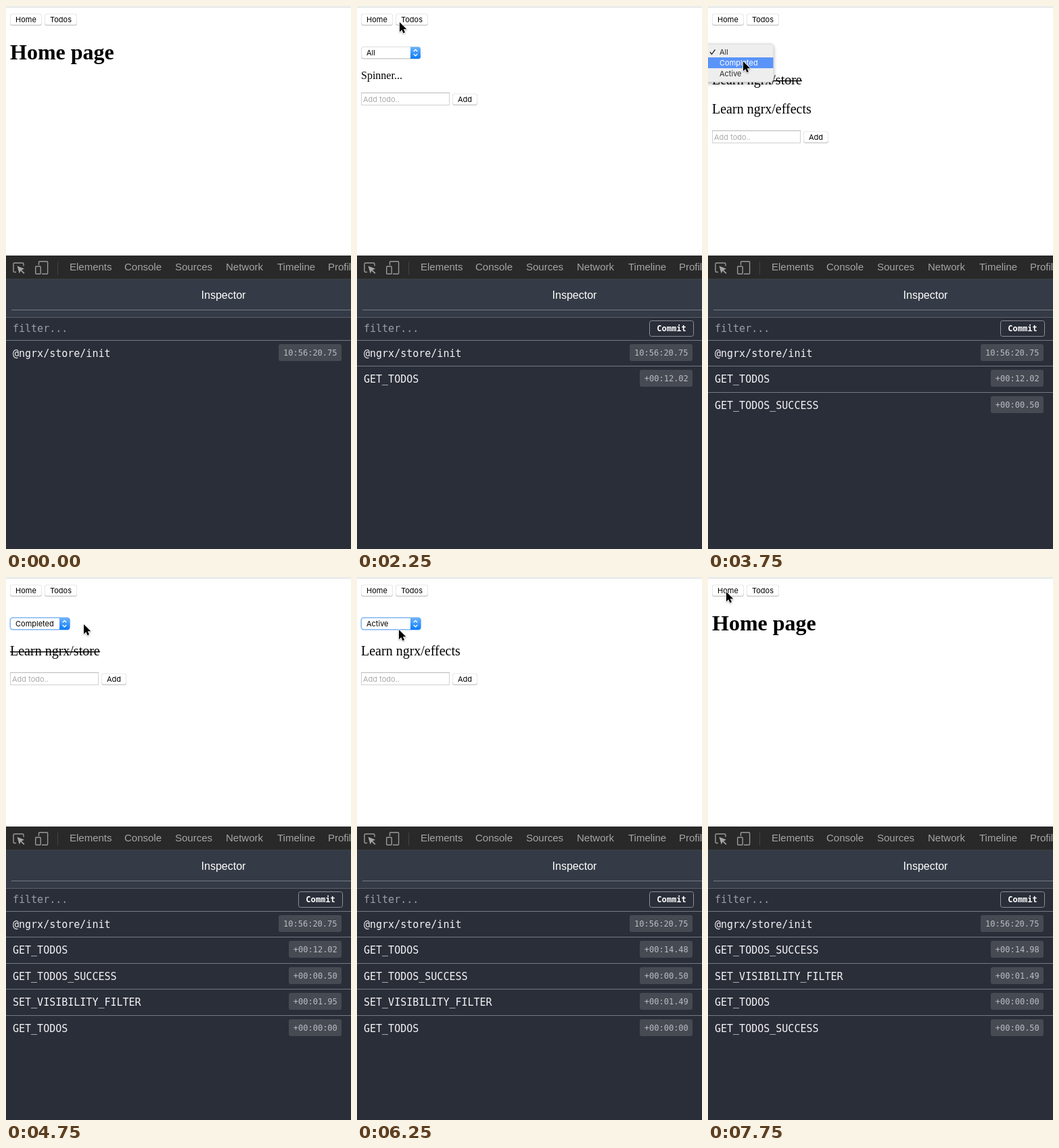
These frames come from a looping animation (510x803 px, 8000 ms). An HTML page:

```html
<!DOCTYPE html>
<html lang="en">
<head>
<meta charset="utf-8">
<title>Todos with inspector</title>
<style>
  html, body { margin: 0; width: 100%; height: 100%; overflow: hidden; background: #fff; }
  svg { display: block; width: 510px; height: 803px; }
  text { white-space: pre; }
  .ui { font: 11px Inter, "Open Sans", sans-serif; }
  .serif { font: 20px "Liberation Serif", Times, serif; }
  .tab { font: 15px "Liberation Sans", Arial, sans-serif; fill: #a5a5a5; }
  .mono { font: 15px "DejaVu Sans Mono", Menlo, monospace; fill: #f4f4f6; }
  .small { font: 12px "DejaVu Sans Mono", Menlo, monospace; }
</style>
</head>
<body>
<svg viewBox="0 0 510 803" xmlns="http://www.w3.org/2000/svg">
  <defs>
    <linearGradient id="blue" x1="0" y1="0" x2="0" y2="1">
      <stop offset="0" stop-color="#6cb3fa"/><stop offset="1" stop-color="#0a7bfb"/>
    </linearGradient>
    <filter id="soft" x="-20%" y="-20%" width="140%" height="150%">
      <feDropShadow dx="0" dy="2" stdDeviation="2.5" flood-opacity=".3"/>
    </filter>
  </defs>
  <rect width="510" height="803" fill="#fff"/>
  <rect y="1" width="510" height="1" fill="#ced1d1"/>
  <g id="page"></g>
  <g id="tools"></g>
  <g id="log"></g>
  <g id="cursor">
    <path d="M0 0V14.2L3.3 11.2 5.5 16.2 8 15.1 5.8 10.2H10.3Z" fill="#000"
      stroke="#fff" stroke-width="1.6" stroke-linejoin="round" paint-order="stroke"
      style="filter:drop-shadow(0 1px 1px rgba(0,0,0,.3))"/>
  </g>
</svg>
<script>
const LOOP = 8000, TICK = 250;
const $ = id => document.getElementById(id);

const text = (x, y, s, cls, extra = '') => `<text x="${x}" y="${y}" class="${cls}" ${extra}>${s}</text>`;
const rect = (x, y, w, h, fill, extra = '') =>
  `<rect x="${x}" y="${y}" width="${w}" height="${h}" fill="${fill}" ${extra}/>`;

function button(x, cy, w, label) {
  return rect(x, cy - 8, w, 17, '#c4c4c4', 'rx="3.5"') +
    rect(x, cy - 8.5, w, 16.5, '#e2e2e2', 'rx="3.5"') +
    rect(x + .8, cy - 7.8, w - 1.6, 15.3, '#fff', 'rx="3"') +
    text(x + w / 2, cy + 4, label, 'ui', 'text-anchor="middle"');
}

function select(label, focused) {
  const ring = focused
    ? rect(5.5, 59.5, 89.5, 19, '#7fb5f2', 'rx="4.5"')
    : rect(6, 61, 88, 17.5, '#c4c4c4', 'rx="3.5"') + rect(6, 60, 88, 17.5, '#dedede', 'rx="3.5"');
  return ring + rect(7, 61, 74, 16, '#fff', 'rx="3"') +
    '<path d="M79 60.5h11.5a3.5 3.5 0 0 1 3.5 3.5v10.500a3.500 3.500 0 0 1-3.500 3.500H79z" fill="url(#blue)"/>' +
    '<path d="M83.700 67.300l2.800-2.800 2.800 2.800M83.700 71l2.800 2.800 2.800-2.800" fill="none" stroke="#fff" stroke-width="1.300"/>' +
    text(14, 73, label, 'ui');
}

const FILTERS = ['All', 'Completed', 'Active'];

// The popup keeps the checked item over the select box.
function menu(checked, hover) {
  const top = 56 - checked * 16;
  return rect(-6, top, 103, 56.5, '#eeeeee', 'rx="5" stroke="#c6c6c6" stroke-width=".6" filter="url(#soft)"') +
    (hover < 0 ? '' : rect(0, top + 20 - 16 + hover * 16 + .0, 96.5, 16, '#5a94f8')) +
    FILTERS.map((name, i) => {
      const y = top + 16 + i * 16, ink = i === hover ? '#fff' : '#2b2b2b';
      const tick = i === checked
        ? `<path d="M3 ${y - 4}l2.500 3.500 5-7" fill="none" stroke="${ink}" stroke-width="1.300"/>` : '';
      return tick + text(17, y, name, 'ui', `fill="${ink}"`);
    }).join('');
}

function todo(y, name, done) {
  return text(6, y, name, 'serif') + (done ? rect(6, y - 6, 133, 1.4, '#000') : '');
}

function page(s) {
  let out = button(6, 20, 47, 'Home') + button(57, 20, 48, 'Todos');
  if (s.view === 'home') {
    return out + text(6, 79, 'Home page', 'serif', 'style="font-size:32px;font-weight:bold"');
  }
  out += select(FILTERS[s.filter], s.focus);
  let cy = 151;
  if (s.view === 'spinner') {
    cy = 138;
    out += text(6, 108, 'Spinner...', 'serif', 'style="font-size:16px"');
  } else {
    if (s.filter < 2) out += todo(116, 'Learn ngrx/store', true);
    if (s.filter !== 1) out += todo(s.filter ? 116 : 159, 'Learn ngrx/effects');
    if (s.filter === 0) cy = 194;
  }
  out += rect(6.5, cy - 9.5, 130, 18, '#fff', 'stroke="#d0d0d0"') +
    rect(6, cy - 10, 131, 1, '#b9b9b9') +
    text(9, cy + 4, 'Add todo..', 'ui', 'fill="#a9a9a9"') + button(141, cy, 37, 'Add');
  return out + (s.menu ? menu(s.filter, s.hover) : '');
}

function tools() {
  const tabs = [[94, 'Elements'], [175, 'Console'], [250, 'Sources'], [325, 'Network'], [401, 'Timeline'], [476, 'Profiles']];
  return rect(0, 369, 510, 35, '#292929') +
    '<g fill="none" stroke="#9a9a9a" stroke-width="1.400">' +
    '<path d="M15 393.500h-2.500a1.500 1.500 0 0 1-1.500-1.500v-10.500a1.500 1.500 0 0 1 1.500-1.500h12a1.500 1.500 0 0 1 1.500 1.500v3"/>' +
    '<path d="M48.500 383v-4a1.300 1.300 0 0 1 1.300-1.300h10.500a1.300 1.300 0 0 1 1.300 1.300v16a1.300 1.300 0 0 1-1.300 1.300H53"/>' +
    '<rect x="43.700" y="385" width="7.500" height="11.300" rx="1"/></g>' +
    '<path d="M16.500 384.500l10.500 4-4 2 4.500 4.300-1.300 1.300-4.500-4.500-2 3.800z" fill="#a5a5a5"/>' +
    rect(76, 378, 1, 19, '#444') +
    tabs.map(([x, s]) => text(x, 391, s, 'tab')).join('') +
    rect(0, 404, 510, 57, '#353b46') + rect(0, 403.5, 510, 1, '#414650') +
    text(321.5, 433, 'Inspector', 'tab', 'text-anchor="middle" style="font-size:16px;fill:#fff"') +
    rect(8, 449, 502, 1, '#757a84') +
    rect(0, 460, 510, 343, '#2a2e39') + rect(0, 460, 510, 1, '#5b606b') +
    text(10, 482, 'filter...', 'mono', 'style="fill:#9b9ea5"');
}

function log(rows) {
  const commit = rows.length > 1
    ? rect(432.5, 465.5, 65, 23, '#2a2e39', 'rx="3" stroke="#8b8e95"') +
      text(465, 481, 'Commit', 'small', 'text-anchor="middle" fill="#fff" font-weight="bold" style="font-weight:bold"')
    : '';
  return commit + rows.map(([name, time], i) => {
    const y = 494 + Math.floor(i * 38.5), x = i ? 418 : 403;
    return rect(0, y, 510, 1, '#747982') + text(10, y + 25, name, 'mono') +
      rect(x, y + 6, 496 - x, 25, '#464a53', 'rx="3"') +
      text((x + 496) / 2 + .3, y + 23, time, 'small', 'text-anchor="middle" fill="#b9bbbf"');
  }).join('');
}

const INIT = ['@ngrx/store/init', '10:56:20.75'];
const get = time => ['GET_TODOS', time];
const done = time => ['GET_TODOS_SUCCESS', time];
const set = time => ['SET_VISIBILITY_FILTER', time];

// Each step changes part of the state at its time in ms.
const STEPS = [
  [0, { view: 'home', filter: 0, focus: false, menu: false, hover: -1, rows: [INIT] }],
  [2000, { view: 'spinner', rows: [INIT, get('+00:12.02')] }],
  [2500, { view: 'list', rows: [INIT, get('+00:12.02'), done('+00:00.50')] }],
  [3250, { menu: true, hover: 0 }],
  [3500, { hover: 1 }],
  [4500, { menu: false, focus: true, filter: 1,
    rows: [INIT, get('+00:12.02'), done('+00:00.50'), set('+00:01.95'), get('+00:00:00')] }],
  [5000, { rows: [INIT, done('+00:12.53'), set('+00:01.95'), get('+00:00:00'), done('+00:00.50')] }],
  [5250, { menu: true, hover: 1 }],
  [5500, { hover: 2 }],
  [6250, { menu: false, filter: 2,
    rows: [INIT, get('+00:14.48'), done('+00:00.50'), set('+00:01.49'), get('+00:00:00')] }],
  [6750, { rows: [INIT, done('+00:14.98'), set('+00:01.49'), get('+00:00:00'), done('+00:00.50')] }],
  [7750, { view: 'home' }]
];

// Pointer tip: time, x, y.
const PATH = [
  [500, 485, 96], [750, 352, 68], [1000, 198, 40], [1250, 96, 27], [1500, 63, 24], [2500, 63, 24],
  [3000, 50, 67], [3250, 50, 69], [3500, 51, 80], [3750, 52, 82], [4250, 52, 82], [4500, 66, 79],
  [4750, 115, 70], [5000, 88, 70], [5250, 58, 69], [5500, 57, 78], [6000, 57, 78], [6250, 62, 78],
  [6500, 112, 76], [6750, 134, 74], [7000, 110, 62], [7250, 58, 36], [7500, 27, 22], [8000, 27, 22]
];

function pointer(t) {
  const i = PATH.findIndex(p => p[0] > t);
  if (i < 1) return null;
  const [t0, x0, y0] = PATH[i - 1], [t1, x1, y1] = PATH[i];
  const k = (t - t0) / (t1 - t0);
  return [x0 + (x1 - x0) * k, y0 + (y1 - y0) * k];
}

function draw(t) {
  const state = Object.assign({}, ...STEPS.filter(s => s[0] <= t).map(s => s[1]));
  $('page').innerHTML = page(state);
  $('log').innerHTML = log(state.rows);
  const tip = pointer(t);
  $('cursor').setAttribute('visibility', tip ? 'visible' : 'hidden');
  if (tip) $('cursor').setAttribute('transform', `translate(${tip})`);
}

$('tools').innerHTML = tools();
const start = performance.now();
let last = -1;
function frame() {
  const t = Math.floor((performance.now() - start) % LOOP / TICK) * TICK;
  if (t !== last) draw(last = t);
  requestAnimationFrame(frame);
}
frame();
</script>
</body>
</html>
```
